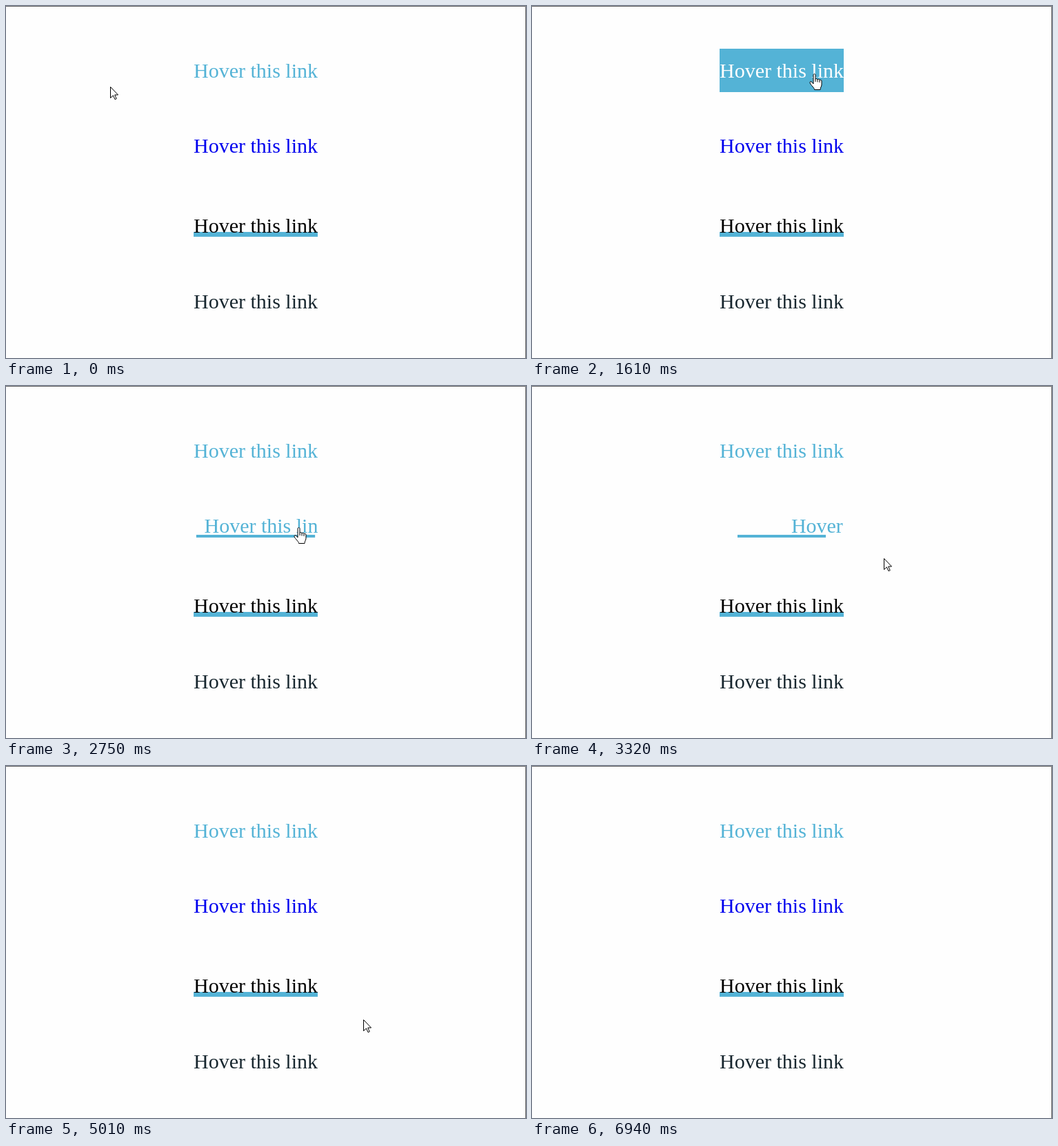
Write an HTML page that moves like this. It is 754 px wide and 511 px high and loops after 7370 ms.

```html
<!DOCTYPE html>
<html lang="en">
<head>
<meta charset="utf-8">
<title>Link hover effects</title>
<style>
  html, body { margin: 0; width: 100%; height: 100%; overflow: hidden; background: #fefefe; }
  svg { display: block; }
  text { font: 30px "Liberation Serif", "Times New Roman", serif; }
  .sky { fill: #54b3d6; }
  .cursor path { fill: #fff; stroke: #000; stroke-linejoin: round; }
</style>
</head>
<body>
<svg width="754" height="511" viewBox="0 0 754 511">
  <clipPath id="swapBox"><rect x="272" y="186" width="180" height="34"/></clipPath>

  <rect id="slide" class="sky" x="272" y="62" height="63"/>
  <text id="slideText" x="272" y="104">Hover this link</text>

  <g clip-path="url(#swapBox)">
    <text id="oldText" y="213" fill="#00e">Hover this link</text>
    <text id="newText" class="sky" y="213">Hover this link</text>
    <rect id="swapLine" class="sky" y="216" height="4"/>
  </g>

  <rect id="grow" class="sky" x="272" width="180"/>
  <text x="272" y="329">Hover this link</text>

  <text x="272" y="439" fill="#18272f">Hover this link</text>
  <rect id="pass" y="444" height="8" rx="4" fill="#18272f"/>

  <path d="M0 .5H753.5V511" fill="none" stroke="#666"/>

  <g id="arrow" class="cursor">
    <path d="M.5 .5V16.5L4.4 12.9L7 18.6L9.2 17.6L6.7 12H11.5Z"/>
  </g>
  <g id="hand" class="cursor">
    <path d="M6 15V2.2C6 .1 9 .1 9 2.2V8.5C9.3 7 12 7.2 12 9C12.5 7.8 15 8 15 9.8C15.4 8.8 18 9 18 11V16C18 19 16 20 16 23.5H7.5C7.5 20.5 3 18 1 13.6C.4 11.6 3 11.2 4 12.6Z"/>
    <path d="M9 8.5V12M12 9V12.5M15 10V13"/>
  </g>
</svg>
<script>
const LOOP = 7370, LEFT = 272, WIDTH = 180;
const HOME = [151, 117];

// Pointer moves: start, end, x, y; it rests in between
const moves = [
  [505, 630, 722, 478], [630, 680, 650, 346],
  [845, 920, 621, 244], [920, 1250, 408, 98],
  [1730, 2060, 510, 172], [2060, 2330, 500, 205],
  [2385, 2480, 423, 205],
  [3045, 3300, 510, 250], [3300, 3760, 464, 289],
  [3780, 3990, 424, 306],
  [4580, 5010, 518, 368],
  [5040, 5180, 425, 425],
  [5860, 6100, 524, 433],
  [6600, 6800, 655, 520]
];

const links = {
  slide: { enter: 1150, leave: 1880, length: 400 },
  swap: { enter: 2443, leave: 3145, length: 400, sharp: .76 },
  grow: { enter: 3940, leave: 4736, length: 190 },
  pass: { enter: 5130, leave: 5942, length: 460 }
};

const $ = id => document.getElementById(id);
const set = (id, attrs) => {
  for (const name in attrs) $(id).setAttribute(name, attrs[name]);
};
const mix = (a, b, k) => a + (b - a) * k;
const smooth = s => s * s * (3 - 2 * s);
const clamp = x => Math.min(1, Math.max(0, x));

// cubic-bezier(a, 0, 1 - a, 1), solved by bisection
function ease(x, a) {
  if (x <= 0 || x >= 1) return clamp(x);
  let lo = 0, hi = 1, s;
  for (let i = 0; i < 24; i++) {
    s = (lo + hi) / 2;
    const at = 3 * s * (1 - s) * mix(a, 1 - a, s) + s ** 3;
    if (at < x) lo = s; else hi = s;
  }
  return smooth(s);
}

function pointer(t) {
  let [x, y] = HOME;
  for (const [start, end, toX, toY] of moves) {
    const k = smooth(clamp((t - start) / (end - start)));
    x = mix(x, toX, k);
    y = mix(y, toY, k);
  }
  return [Math.round(x), Math.round(y)];
}

function hover({ enter, leave, length, sharp = .42 }, t) {
  return ease((t - enter) / length, sharp) - ease((t - leave) / length, sharp);
}

function draw(t) {
  const [slide, swap, grow, pass] = Object.values(links).map(link => hover(link, t));

  const tint = [84, 179, 214].map(c => Math.round(mix(c, 255, slide)));
  set("slide", { width: Math.min(WIDTH, 200 * slide) });
  set("slideText", { fill: `rgb(${tint})` });

  set("oldText", { x: LEFT - 2 * WIDTH * swap });
  set("newText", { x: LEFT + 2 * WIDTH * (1 - swap) });
  set("swapLine", { x: LEFT + WIDTH * (1 - swap) / 2, width: WIDTH * swap });

  set("grow", { y: 328 - 26 * grow, height: 7 + 26 * grow });

  // The underline enters from the left and leaves to the right
  const leaving = t >= links.pass.leave;
  set("pass", { x: leaving ? LEFT + WIDTH * (1 - pass) : LEFT, width: WIDTH * pass });

  const [x, y] = pointer(t);
  const over = Object.values(links).some(({ enter, leave }) => t >= enter && t < leave);
  set("arrow", { transform: `translate(${x} ${y})`, visibility: over ? "hidden" : "visible" });
  set("hand", { transform: `translate(${x - 6} ${y})`, visibility: over ? "visible" : "hidden" });
}

const start = performance.now();
function tick() {
  draw((performance.now() - start) % LOOP);
  requestAnimationFrame(tick);
}
tick();
</script>
</body>
</html>
```
